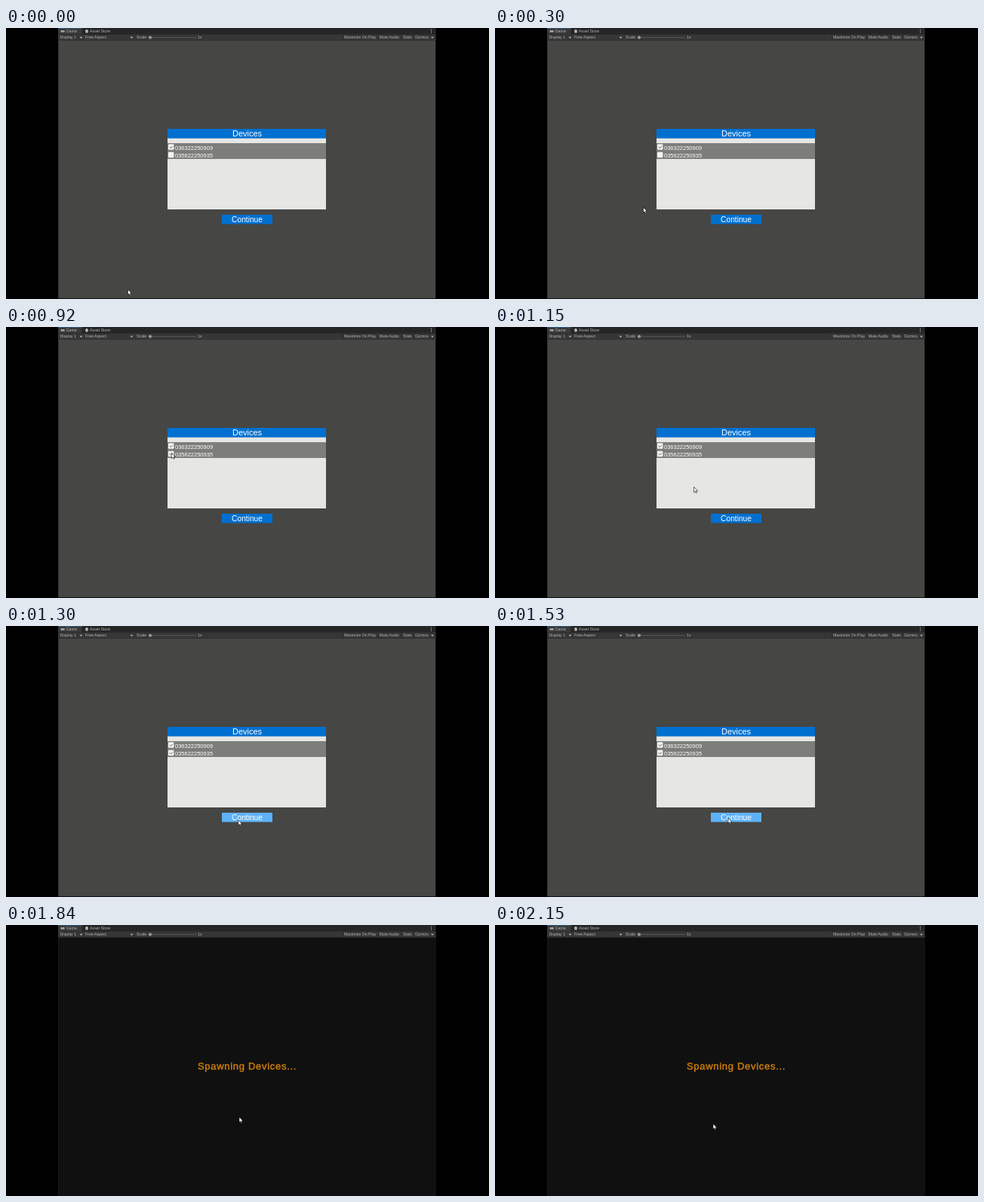
Recreate the animation shown at these times as an HTML page. Size 640 px wide and 360 px high, loop 2.23 s.

```html
<!DOCTYPE html>
<html lang="en">
<head>
<meta charset="utf-8">
<title>Device selection</title>
<style>
  html, body { margin: 0; width: 100%; height: 100%; overflow: hidden; background: #000; }
  svg { display: block; width: 640px; height: 360px; font-family: "Liberation Sans", Arial, sans-serif; }
  .bar { font-size: 5.25px; fill: #b4b4b4; }
  .ui { fill: #fff; }
  .mid { text-anchor: middle; }
  .tick { fill: none; stroke: #555; stroke-width: .9; }
</style>
</head>
<body>
<svg viewBox="0 0 640 360">
  <rect width="640" height="360"/>
  <rect x="69" width="500.5" height="359.5" fill="#202020"/>
  <rect id="scene" x="69.5" y="16.5" width="499.5" height="342.5"/>

  <g class="bar">
    <rect x="69" width="500.5" height="8.5" fill="#262626"/>
    <rect x="69" width="31.5" height="8.5" fill="#393939"/>
    <rect x="69" width="31.5" height=".9" fill="#2c5d87"/>
    <rect x="69" y="8.5" width="500.5" height="8" fill="#363636"/>
    <path d="M72.5 4.4a1.3 1.3 0 0 1 2.6 0a1.3 1.3 0 0 1 2.6 0a1.3 1.3 0 0 1-2.6 0a1.3 1.3 0 0 1-2.6 0M105 3h4l-.5 3.6h-3zM106 3v-1h2v1"/>
    <text x="79.5" y="6.3">Game</text>
    <text x="111" y="6.3">Asset Store</text>
    <text x="71.5" y="14.3">Display 1</text>
    <text x="105" y="14.3">Free Aspect</text>
    <text x="173" y="14.3">Scale</text>
    <text x="254" y="14.3">1x</text>
    <text x="448" y="14.3">Maximize On Play</text>
    <text x="494.5" y="14.3">Mute Audio</text>
    <text x="526" y="14.3">Stats</text>
    <text x="542" y="14.3">Gizmos</text>
    <path d="M97.5 11.7h4l-2 2.2zM164.5 11.7h4l-2 2.2zM563 11.7h4l-2 2.2zM563 1.7h1v1h-1zM563 3.7h1v1h-1zM563 5.7h1v1h-1z"/>
    <path d="M189 12.6H252" stroke="#5e5e5e" stroke-width=".8"/>
    <circle cx="191" cy="12.6" r="2.1" fill="#999"/>
    <path d="M446.5 9v7M493 9v7M524.5 9v7M540 9v7" stroke="#262626" stroke-width=".6"/>
  </g>

  <g id="menu" class="ui">
    <rect x="214" y="134" width="210" height="107" fill="#e6e6e4"/>
    <rect x="214" y="134" width="210" height="12.6" fill="#0070d0"/>
    <rect x="214" y="153" width="210" height="21" fill="#7d7d7b"/>
    <text class="mid" x="319.5" y="144.2" font-size="11">Devices</text>
    <g font-size="7.5">
      <text x="224" y="161.8">036322250909</text>
      <text x="224" y="172.1">035622250935</text>
    </g>
    <rect x="215" y="154.2" width="7.4" height="7.6" rx="1.2" fill="#f4f4f4"/>
    <rect x="215" y="164.7" width="7.4" height="7.6" rx="1.2" fill="#f4f4f4"/>
    <path class="tick" d="M216.8 157.8l1.6 1.8 2.5-2.7"/>
    <path id="tick" class="tick" d="M216.8 168.3l1.6 1.8 2.5-2.7"/>
    <rect id="button" x="286" y="248" width="67" height="12.4"/>
    <text class="mid" x="319.5" y="257.8" font-size="10.2">Continue</text>
  </g>

  <text id="status" x="254" y="192.2" font-size="13" letter-spacing=".7"
        fill="#cb7b10" stroke="#cb7b10" stroke-width=".45">Spawning Devices...</text>

  <path id="cursor" d="M0 0V7.2L1.6 5.7L2.8 8.2L4 7.6L2.9 5.3H5Z" fill="#fff" stroke="#000" stroke-width=".6"/>
</svg>
<script>
  const LOOP = 2230, STEP = 230 / 3, LAST_STEP = 28;
  const PRESS = 23, SPAWN = 24, CHECK = 11;

  // Pointer stops: step, x, y
  const stops = [
    [0, 161.5, 347.3], [7, 219.3, 167.3], [13, 219.3, 167.3], [17, 307.8, 257.6],
    [20, 309, 255], [24, 309, 255], [28, 289, 264]
  ];
  const $ = id => document.getElementById(id);
  const [scene, menu, tick, button, status, cursor] =
    ["scene", "menu", "tick", "button", "status", "cursor"].map($);
  const show = (el, on) => el.setAttribute("visibility", on ? "inherit" : "hidden");

  function pointerAt(step) {
    const i = Math.max(1, stops.findIndex(s => s[0] >= step));
    const [a, ax, ay] = stops[i - 1], [b, bx, by] = stops[i];
    const p = (step - a) / (b - a), e = p * p * (3 - 2 * p);
    return [ax + (bx - ax) * e, ay + (by - ay) * e];
  }

  function draw(now) {
    const time = now % LOOP;
    const step = Math.min(LAST_STEP, Math.floor((time + 6.7) / STEP));
    const [x, y] = pointerAt(step);
    const spawning = step >= SPAWN;
    const hover = x > 286 && x < 353 && y > 248 && y < 260.4;

    scene.setAttribute("fill", spawning ? "#0f100f" : "#464644");
    menu.style.display = spawning ? "none" : "";
    show(status, spawning);
    show(tick, step >= CHECK);
    button.setAttribute("fill", step >= PRESS ? "#3274aa" : hover ? "#5eb1f7" : "#0070d0");
    cursor.setAttribute("transform", `translate(${x} ${y})`);
    requestAnimationFrame(draw);
  }
  draw(performance.now());
</script>
</body>
</html>
```
